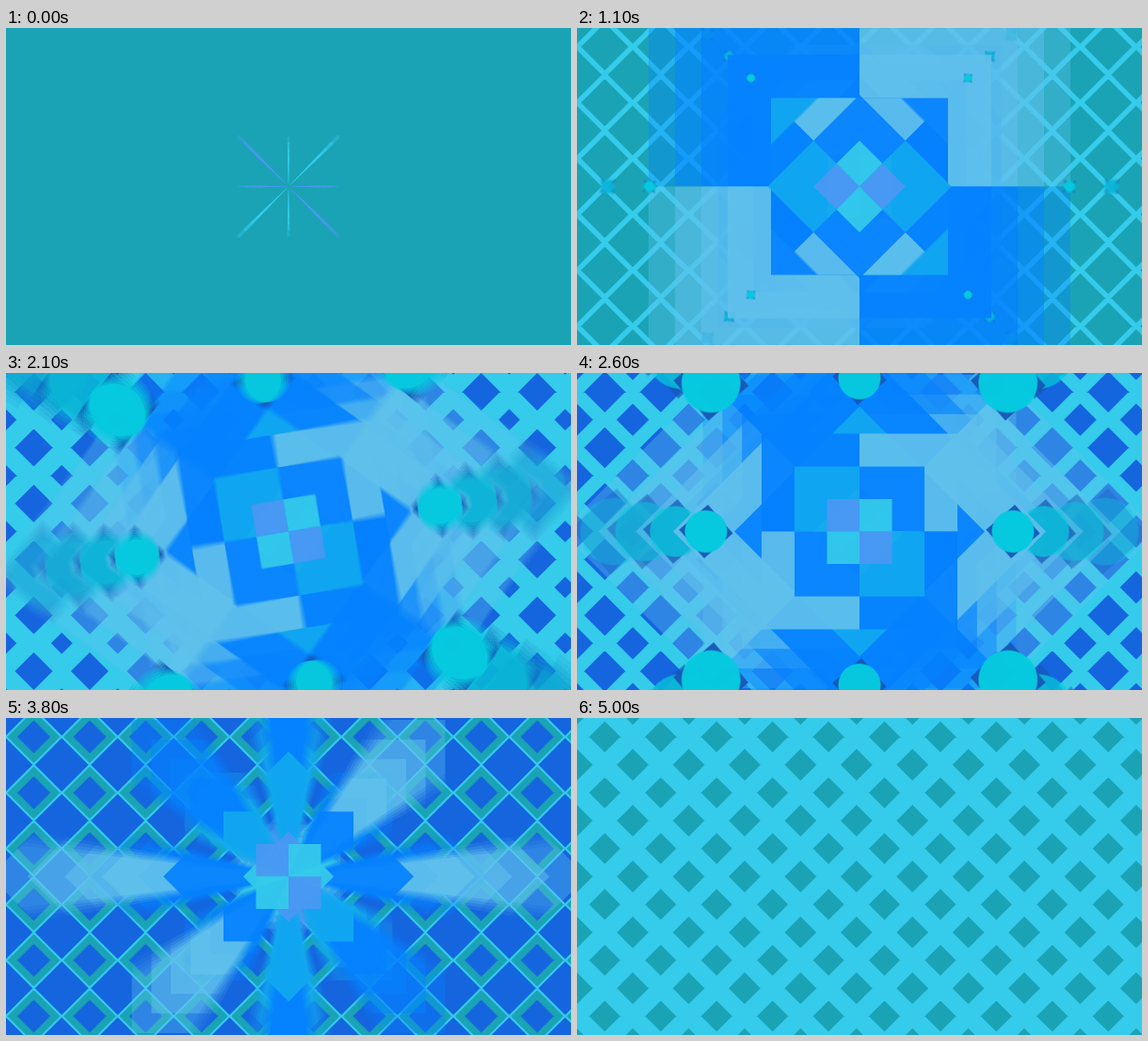
Animation, 600 px wide and 337 px high, one loop 5100 ms. Source, as an HTML page with a canvas:

```html
<!DOCTYPE html>
<html lang="en">
<head>
<meta charset="utf-8">
<title>Kaleidoscope</title>
<style>
  html, body { margin: 0; width: 100%; height: 100%; overflow: hidden; background: #1aa3b5; }
  canvas { display: block; }
</style>
</head>
<body>
<canvas id="stage" width="600" height="337"></canvas>
<script>
const W = 600, H = 337, LOOP = 5100, STEP = 100;
const PITCH = 59.4, ORIGIN_X = 29.5, ORIGIN_Y = 20;
const TEAL = '#1aa3b5', CYAN = '#35cbeb', ROYAL = '#1565df';
const BLUE = '#0582ff', LIGHT = '#60c0ec', MID = '#12a9f0', PURPLE = '#4b98f3';
const RAD = Math.PI / 180;

const screen2d = document.getElementById('stage').getContext('2d');
const buffer = document.createElement('canvas');
buffer.width = W;
buffer.height = H;
const ctx = buffer.getContext('2d');

const clamp = u => Math.max(0, Math.min(1, u));
const ease = u => u < 0.5 ? 4 * u ** 3 : 1 - 4 * (1 - u) ** 3;
const ramp = (t, start, length) => ease(clamp((t - start) / length));

// Keys are [time, radius, halfThickness].
const CYAN_KEYS = [[0, 26.5, 0], [100, 26.5, 0.4], [600, 26.5, 1.5], [1050, 29, 4],
  [1600, 30.8, 0.6], [2100, 34, 14], [3400, 28, 2.5], [4200, 30.8, 0.6], [5000, 29.5, 13], [5100, 29.5, 15]];
const TEAL_KEYS = [[0, 37, 40], [1000, 37, 40], [1600, 37, 16], [2200, 37, 0],
  [3500, 23, 0], [4200, 23, 14], [4800, 23, 40], [5100, 23, 40]];

function sample(keys, t) {
  const i = Math.max(1, keys.findIndex(k => k[0] >= t));
  const a = keys[i - 1], b = keys[i];
  let u = clamp((t - a[0]) / (b[0] - a[0]));
  u = u * u * (3 - 2 * u);
  return [a[1] + (b[1] - a[1]) * u, a[2] + (b[2] - a[2]) * u];
}

// Diamond outlines; large radii are drawn around the gaps instead.
function lattice(color, [radius, half]) {
  if (half < 0.05) return;
  const flip = radius > 31.5;
  const shift = flip ? PITCH / 2 : 0;
  const r = flip ? PITCH - radius : radius;
  ctx.beginPath();
  for (let x = ORIGIN_X + shift - PITCH * 2; x < W + PITCH; x += PITCH) {
    for (let y = ORIGIN_Y + shift - PITCH * 2; y < H + PITCH; y += PITCH) {
      ctx.moveTo(x + r, y);
      ctx.lineTo(x, y + r);
      ctx.lineTo(x - r, y);
      ctx.lineTo(x, y - r);
      ctx.closePath();
    }
  }
  ctx.strokeStyle = color;
  ctx.lineWidth = half * Math.SQRT2;
  ctx.stroke();
}

// Four quarters in two alternating colours, each fanned open around its diagonal.
function fanSquare(half, angle, open, colors) {
  if (open <= 0.001) return;
  const near = half * Math.tan((1 - open) * 45 * RAD);
  ctx.save();
  ctx.rotate((angle + 180) * RAD);
  for (let q = 0; q < 4; q++) {
    ctx.beginPath();
    ctx.moveTo(0, 0);
    ctx.lineTo(half, near);
    ctx.lineTo(half, half);
    ctx.lineTo(near, half);
    ctx.closePath();
    ctx.fillStyle = colors[q % 2];
    ctx.fill();
    ctx.rotate(Math.PI / 2);
  }
  ctx.restore();
}

const SQUARES = [
  { name: 'wide', half: 140, angle: 0, colors: [BLUE, LIGHT], enter: 215, leave: 3350, span: 700 },
  { name: 'frame', half: 104, angle: -45, colors: [BLUE, LIGHT], enter: 0, leave: 3400, span: 700 },
  { name: 'plate', half: 94, angle: 0, colors: [MID, BLUE], enter: 0, leave: 3400, span: 700 },
  { name: 'star', half: 34, angle: 0, colors: [PURPLE, CYAN], enter: -160, leave: 3800, span: 800 },
  { name: 'inner', half: 69, angle: -45, colors: [MID, BLUE], enter: 0, leave: 3450, span: 700 },
  { name: 'core', half: 34.5, angle: -45, colors: [PURPLE, CYAN], enter: -160, leave: 4000, span: 700 }
];
const EARLY = [0, 2, 1, 3, 4, 5].map(i => SQUARES[i]);
EARLY.splice(1, 2, SQUARES[1], SQUARES[2]);
const LATE = [SQUARES[0], SQUARES[2], SQUARES[1], ...SQUARES.slice(3)];
const SQUARE_ALPHA = [0.92, 0.62, 0.48, 0.34];
const DISC_ALPHA = [0.96, 0.72, 0.5, 0.34];

function drawSquares(t, echo, spin) {
  const scale = 1 + 0.2 * echo;
  ctx.globalAlpha = SQUARE_ALPHA[echo];
  for (const s of t < 1000 ? EARLY : LATE) {
    const open = ramp(t, s.enter, 800) * (1 - ramp(t, s.leave, s.span));
    let half = s.half * scale, angle = s.angle + spin;
    ctx.save();
    if (s.name === 'frame') {
      half *= 0.72 + 0.28 * ramp(t, 600, 800);
      if (t >= 1000 && spin < 30) {
        const edge = (94 + spin * 6) * scale;
        ctx.rotate(spin * RAD);
        ctx.beginPath();
        ctx.rect(-edge, -edge, edge * 2, edge * 2);
        ctx.clip();
        ctx.rotate(-spin * RAD);
      }
    }
    if (s.name === 'core') {
      half *= 0.69 + 0.31 * ramp(t, 0, 600);
      angle += 45 * ramp(t, 3809, 800);
    }
    fanSquare(half, angle, open, s.colors);
    ctx.restore();
  }
}

function drawDiscs(t, echo, spin) {
  const size = ramp(t, 850, 700) * (1 - ramp(t, 2400, 800));
  if (size < 0.01) return;
  const scale = 1 + 0.2 * echo;
  for (let k = 0; k < 8; k++) {
    const diagonal = k % 2;
    const distance = (diagonal ? 163 : 223) * scale;
    const r = (diagonal ? 24 : 33.5) * scale * size;
    const a = (k * 45 + spin) * RAD;
    ctx.save();
    ctx.globalAlpha = DISC_ALPHA[echo];
    ctx.translate(distance * Math.cos(a), distance * Math.sin(a));
    ctx.rotate((spin + 4) * RAD);
    ctx.fillStyle = '#1758b8';
    ctx.fillRect(-r * 0.9, -r * 0.9, r * 1.8, r * 1.8);
    ctx.beginPath();
    ctx.arc(0, 0, r, 0, Math.PI * 2);
    ctx.fillStyle = '#06cde0';
    ctx.fill();
    ctx.restore();
  }
}

function drawScene(t) {
  ctx.globalAlpha = 1;
  ctx.fillStyle = ROYAL;
  ctx.fillRect(0, 0, W, H);
  lattice(TEAL, sample(TEAL_KEYS, t));
  lattice(CYAN, sample(CYAN_KEYS, t));

  const spin = 45 * ramp(t, 1600, 800);
  ctx.save();
  ctx.translate(300, 168.5);
  for (let echo = 3; echo >= 0; echo--) {
    drawSquares(t, echo, spin);
    drawDiscs(t, echo, spin);
  }
  ctx.restore();
}

// Averages a few moments for a short motion blur.
function render(t) {
  const passes = 5;
  for (let i = 0; i < passes; i++) {
    drawScene(Math.max(0, t + (i - 2) * 9));
    screen2d.globalAlpha = 1 / (i + 1);
    screen2d.drawImage(buffer, 0, 0);
  }
}

const begin = performance.now();
let shown = -1;
function tick() {
  const elapsed = Math.max(0, performance.now() - begin) % LOOP;
  const t = Math.floor(elapsed / STEP) * STEP;
  if (t !== shown) {
    shown = t;
    render(t);
  }
  requestAnimationFrame(tick);
}
tick();
</script>
</body>
</html>
```
